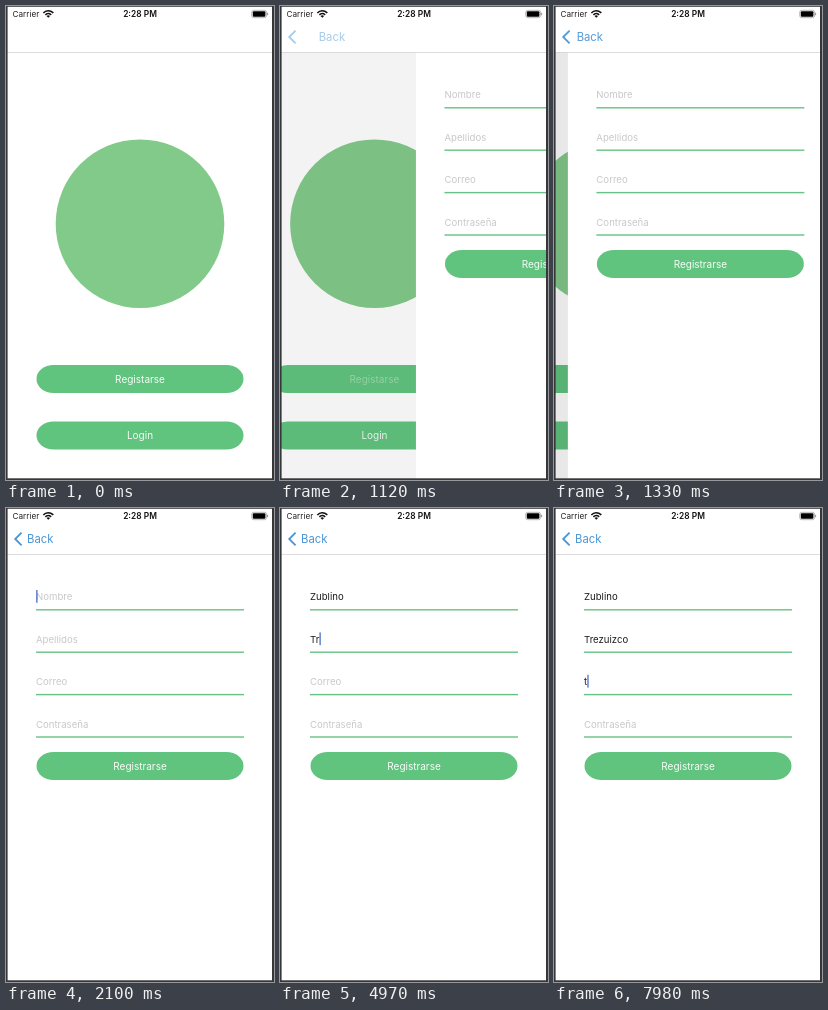
An HTML page with a canvas for the animation above (8000 ms loop, 268x474 px).

```html
<!DOCTYPE html>
<html lang="es">
<head>
<meta charset="utf-8">
<title>Registro</title>
<style>
  html, body { margin: 0; width: 100%; height: 100%; overflow: hidden; background: #fff; }
  canvas { display: block; width: 100vw; height: 100vh; }
</style>
</head>
<body>
<canvas id="stage"></canvas>
<script>
const W = 268, H = 474, LOOP = 8000, STEP = 70;
const LEFT = 30, RIGHT = 238, NAV_BOTTOM = 46, PAGE_W = 266;
const GREEN = '#60c47e', BLUE = '#4a96d6', CARET = '#4c6fc4';
const PUSH_START = 1010, PUSH_END = 1610, PRESS = 840;

const canvas = document.getElementById('stage');
const ctx = canvas.getContext('2d');
const dpr = window.devicePixelRatio || 1;
canvas.width = W * dpr;
canvas.height = H * dpr;

// focus: when the caret arrives; keys: when each letter appears
const fields = [
  { hint: 'Nombre', value: 'Zublino', focus: 2100, keys: [3290, 3500, 3570, 3780, 3850, 3920, 4060] },
  { hint: 'Apellidos', value: 'Trezuizco', focus: 4200, keys: [4690, 4970, 5110, 5250, 5320, 5460, 5530, 5670, 5740] },
  { hint: 'Correo', value: 't', focus: 6090, keys: [7980] },
  { hint: 'Contraseña', value: '', focus: Infinity, keys: [] }
];

// caret blinks as [fade-out start, fade-in start, fully visible]
const blinks = [[2730, 3080, 3150], [6650, 7000, 7140], [7700, 7980, 7980]];

const clamp = v => Math.max(0, Math.min(1, v));

function text(str, x, y, size, color, { align = 'left', weight = 400, alpha = 1 } = {}) {
  ctx.save();
  ctx.globalAlpha *= alpha;
  ctx.font = `${weight} ${size}px Inter, "Liberation Sans", sans-serif`;
  ctx.textAlign = align;
  ctx.textBaseline = 'alphabetic';
  ctx.fillStyle = color;
  ctx.fillText(str, x, y);
  const width = ctx.measureText(str).width;
  ctx.restore();
  return width;
}

function rect(x, y, w, h, color) {
  ctx.fillStyle = color;
  ctx.fillRect(x, y, w, h);
}

function button(label, y, alpha = 0.95) {
  ctx.fillStyle = GREEN;
  ctx.beginPath();
  ctx.roundRect(LEFT + 0.5, y, RIGHT - LEFT - 1, 28, { x: 17, y: 14 });
  ctx.fill();
  text(label, 134, y + 17.7, 10, '#fff', { align: 'center', alpha });
}

// critically damped spring
function pushProgress(t) {
  if (t >= PUSH_END) return 1;
  const u = Math.max(0, t - PUSH_START) * 0.0151;
  return 1 - (1 + u) * Math.exp(-u);
}

function caretAlpha(t) {
  for (const [out, back, full] of blinks) {
    if (t >= out && t < back) return t < out + STEP ? 0.5 : 0;
    if (t >= back && t < full) return (t - back + STEP) / (full - back + STEP);
  }
  return 1;
}

function drawStatusBar() {
  text('Carrier', 6.5, 11.3, 8.2, '#222');
  text('2:28 PM', 134, 11.4, 8.4, '#111', { align: 'center', weight: 600 });

  ctx.strokeStyle = ctx.fillStyle = '#111';
  ctx.lineWidth = 1.5;
  for (const r of [4, 6.8]) {
    ctx.beginPath();
    ctx.arc(42.3, 11.6, r, -Math.PI * 0.76, -Math.PI * 0.24);
    ctx.stroke();
  }
  ctx.beginPath();
  ctx.moveTo(42.3, 11.8);
  ctx.arc(42.3, 11.8, 2.5, -Math.PI * 0.76, -Math.PI * 0.24);
  ctx.fill();

  ctx.lineWidth = 0.6;
  ctx.strokeStyle = '#888';
  ctx.beginPath();
  ctx.roundRect(245.7, 4.3, 14.8, 7.4, 2);
  ctx.stroke();
  ctx.fillStyle = '#000';
  ctx.beginPath();
  ctx.roundRect(246.8, 5.3, 12.6, 5.4, 1);
  ctx.fill();
  rect(261.2, 6.8, 0.9, 2.4, '#888');
}

function drawNavBar(p) {
  rect(0, 0, W, NAV_BOTTOM, '#fff');
  rect(0, NAV_BOTTOM, W, 0.8, '#d5d5d7');
  drawStatusBar();
  ctx.save();
  ctx.globalAlpha = p;
  ctx.strokeStyle = BLUE;
  ctx.lineWidth = 1.8;
  ctx.beginPath();
  ctx.moveTo(15.6, 24.6);
  ctx.lineTo(9.2, 31);
  ctx.lineTo(15.6, 37.4);
  ctx.stroke();
  text('Back', 21 + 35 * (1 - p), 35.1, 11.3, BLUE);
  ctx.restore();
}

function drawHome(t, p) {
  ctx.save();
  ctx.translate(-80 * p, 0);
  ctx.fillStyle = '#82ca89';
  ctx.beginPath();
  ctx.arc(134, 217.7, 84.3, 0, Math.PI * 2);
  ctx.fill();
  const labelAlpha = t < PRESS ? 0.95 : 0.25 + 0.25 * clamp((t - 1050) / 140);
  button('Registarse', 359, labelAlpha);
  button('Login', 415.5);
  ctx.restore();
  rect(0, NAV_BOTTOM, W, H, `rgba(0,0,0,${0.095 * p})`);
}

function drawField(field, i, t) {
  const mid = 88.5 + 42.4 * i;
  const typed = field.value.slice(0, field.keys.filter(k => k <= t).length);
  const next = fields[i + 1];
  const focused = t >= field.focus && !(next && t >= next.focus);

  const width = typed
    ? text(typed, LEFT, mid + 3.8, 9.6, '#1c1c1e')
    : (text(field.hint, LEFT, mid + 3.8, 9.6, '#c8c8cb'), 0);
  rect(LEFT, mid + 12.6, RIGHT - LEFT, 1.4, '#68c184');

  if (focused) {
    ctx.save();
    ctx.globalAlpha = caretAlpha(t);
    rect(LEFT + width + 0.2, mid - 6.5, 1.3, 12.8, CARET);
    ctx.restore();
  }
}

function drawForm(t, p) {
  ctx.save();
  ctx.translate(PAGE_W * (1 - p), 0);
  rect(p < 1 ? 1.5 : 0, NAV_BOTTOM, W, H, '#fff');
  fields.forEach((field, i) => drawField(field, i, t));
  button('Registrarse', 244);
  ctx.restore();
}

function drawBezel() {
  const color = '#37373a';
  rect(0, 0, W, 0.8, color);
  rect(0, 0, 1.6, H, color);
  rect(PAGE_W, 0, 2, H, color);
  rect(0, 472.3, W, 2, color);
}

function draw(now) {
  const t = Math.floor((now % LOOP) / STEP) * STEP;
  const p = pushProgress(t);
  ctx.setTransform(dpr, 0, 0, dpr, 0, 0);
  rect(0, 0, W, H, '#fff');
  if (p < 1) drawHome(t, p);
  if (p > 0) drawForm(t, p);
  drawNavBar(p);
  drawBezel();
}

const start = performance.now();
function tick() {
  draw(performance.now() - start);
  requestAnimationFrame(tick);
}
tick();
</script>
</body>
</html>
```
